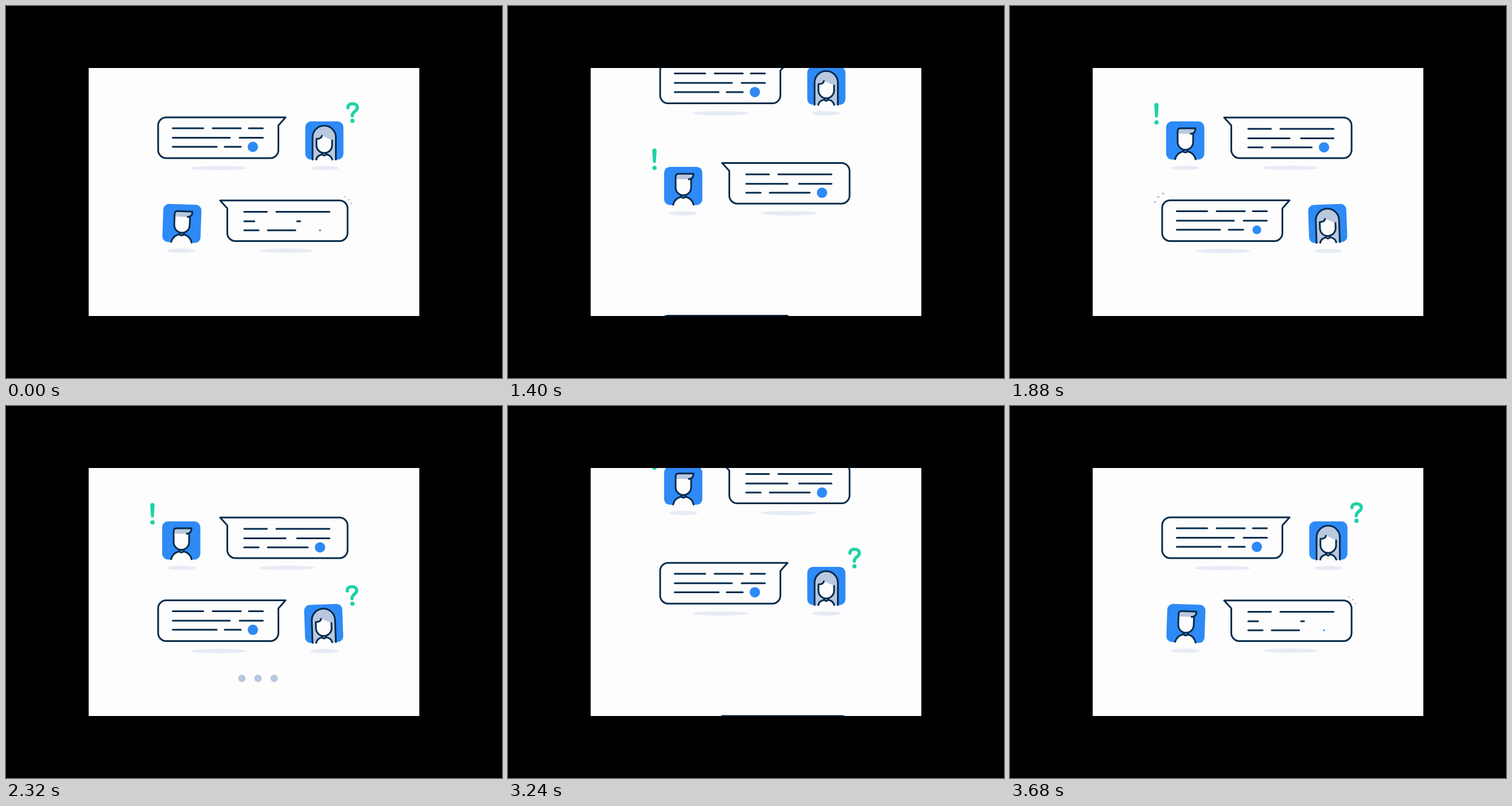
An HTML page that plays this animation: 864 px wide and 648 px high, repeating every 3720 ms.

```html
<!DOCTYPE html>
<html lang="en">
<head>
<meta charset="utf-8">
<title>Chat loop</title>
<style>
  html, body { margin: 0; width: 100%; height: 100%; overflow: hidden; background: #000; }
  svg { display: block; width: 864px; height: 648px; }
  .ink { fill: none; stroke: #052c4c; stroke-width: 3; stroke-linecap: round; stroke-linejoin: round; }
  .box { fill: #fdfdfd; }
  .blue { fill: #2e8af6; }
  .grey { fill: #b9c7df; }
  .white { fill: #fdfdfd; }
  .shade { fill: #e6ebf5; }
  .green { fill: #20d2a5; }
  .hook { fill: none; stroke: #20d2a5; stroke-width: 5.6; stroke-linecap: round; }
</style>
</head>
<body>
<svg viewBox="0 0 864 648">
  <defs><clipPath id="panel"><rect x="144" y="108" width="576" height="432"/></clipPath></defs>
  <rect width="864" height="648" fill="#000"/>
  <rect x="144" y="108" width="576" height="432" class="white"/>
  <g id="stage" clip-path="url(#panel)"></g>
</svg>
<script>
const HALF = 1840, CYCLE = 2 * HALF, LOOP = 3720;

// Both messages are laid out at their resting place in the lower row.
const woman = {
  delay: 0, sign: -1,
  bubble: 'M279 338.5H487L474.5 352.5V395.5A14 14 0 0 1 460.5 409.5H279A14 14 0 0 1 265 395.5V352.5A14 14 0 0 1 279 338.5Z',
  // x1, x2, y, start of drawing
  lines: [
    [290.5, 343.5, 357.5, 1426], [360, 409, 357.5, 1535], [423, 447.5, 357.5, 1569],
    [290.5, 390, 374, 1605], [407, 447.5, 374, 1625],
    [290.5, 367, 389.8, 1660], [381, 409, 389.8, 1690]
  ],
  disc: [430, 389.8, 1800],
  bubbleShade: 370.5, faceX: 554.7, shadeY: 426.8,
  corner: [279, 353], sparkStart: 1625,
  markAt: [603.5, 344.5],
  mark: `<path class="hook" d="M595.6 321.6C595.6 317 599 314.8 603.8 314.8C609 314.8 612 317.6 612 321.8C612 328 603.2 328 603.2 335.6"/>
    <circle class="green" cx="603.5" cy="344.5" r="3.7"/>`,
  face: `<rect class="blue" x="521.3" y="345.6" width="66.5" height="66.5" rx="10"/>
    <path class="grey" d="M534 412V373.3A20.3 20.3 0 0 1 574.6 373.3V412Z"/>
    <path class="white" d="M540.5 413C541.5 406 546 403.5 550.5 402.5H558C563 403.5 567 406 568.2 413Z"/>
    <path class="white" d="M540.8 376Q549.5 376 550.3 370L568 378.5V387A13.6 13.6 0 0 1 540.8 387Z"/>
    <path class="ink" d="M534 412V373.3A20.3 20.3 0 0 1 574.6 373.3V412
      M550.3 370.5Q549.5 376 540.8 376V387A13.6 13.6 0 0 0 568 387V378.5
      M540.5 412C541.5 407 546 404 550.5 403 M558 403C563 404 567 407 568.2 412
      M550.5 402Q554.3 408 558 402"/>`
};

const man = {
  delay: HALF, sign: 1,
  bubble: 'M373 338.8H581A14 14 0 0 1 595 352.8V395.5A14 14 0 0 1 581 409.5H399.5A14 14 0 0 1 385.5 395.5V352.5Z',
  lines: [
    [415, 454.5, 358.5, 1430], [471, 563.5, 358.5, 1500],
    [415, 487, 375, 1762], [507, 563.5, 375, 1793],
    [415, 440, 390.7, 1595], [456, 525.5, 390.7, 1691]
  ],
  disc: [547, 390.7, 1828],
  bubbleShade: 489, faceX: 305, shadeY: 426.3,
  corner: [581, 353], sparkStart: 1740,
  markAt: [255.2, 347.3],
  mark: `<path class="green" d="M251.2 317.5Q251.2 313.5 255 313.5T258.9 317.5L257.6 336.5Q257.2 339 255 339T252.6 336.5Z"/>
    <circle class="green" cx="255.2" cy="347.3" r="3.8"/>`,
  face: `<rect class="blue" x="272" y="345.5" width="66.5" height="66.5" rx="10"/>
    <path class="white" d="M287.6 413C289.5 404 294 399.5 301.5 397.8H309.5C317 399.5 321.5 404 323.3 413Z"/>
    <path class="white" d="M292 364H319V381.5A13.5 13.5 0 0 1 292 381.5Z"/>
    <path class="grey" d="M292 367V362.5Q292 357.5 297 357.5H323Q323 367 315 367Z"/>
    <path class="ink" d="M314.8 367Q323 367 323 357.5H297Q292 357.5 292 362.5V381.5A13.5 13.5 0 0 0 319 381.5V367
      M287.6 411.5C289.5 404 294 399.5 301.5 397.8 M309.5 397.8C317 399.5 321.5 404 323.3 411.5
      M301.3 396Q302 399.6 305.5 399.6T309.7 396"/>`
};

const clamp = x => Math.max(0, Math.min(1, x));
const span = (t, start, dur) => clamp((t - start) / dur);
const sine = x => 0.5 - 0.5 * Math.cos(Math.PI * x);
const outCubic = x => 1 - (1 - x) ** 3;
const outBack = x => x <= 0 ? 0 : 1 + 2.4 * (x - 1) ** 3 + 1.4 * (x - 1) ** 2;

// Smooth value through [time, value] pairs
function track(t, keys) {
  if (t <= keys[0][0]) return keys[0][1];
  for (let i = 1; i < keys.length; i++) {
    const [a, from] = keys[i - 1], [b, to] = keys[i];
    if (t < b) return from + (to - from) * sine((t - a) / (b - a));
  }
  return keys[keys.length - 1][1];
}

const scroll = t => 1.007 * sine(span(t, 1200, 430)) - 0.007 * sine(span(t, 1640, 140));
const TILT = [[1480, 0], [1640, 3.9], [1840, 2], [2320, 2], [2560, 0]];
const SWING = [[1980, 0], [2320, 3], [2600, 4], [2860, 0]];

const stage = document.getElementById('stage');
function add(parent, name, attrs = {}, inner = '') {
  const el = document.createElementNS('http://www.w3.org/2000/svg', name);
  set(el, attrs);
  el.innerHTML = inner;
  return parent.appendChild(el);
}
function set(el, attrs) {
  for (const k in attrs) el.setAttribute(k, attrs[k]);
}
const show = (el, on) => set(el, { visibility: on ? 'inherit' : 'hidden' });

function makeRow(spec, extra) {
  const g = add(stage, 'g');
  const shade = add(g, 'ellipse', { class: 'shade', cx: spec.bubbleShade, cy: spec.shadeY, ry: 3.7 });
  add(g, 'ellipse', { class: 'shade', cx: spec.faceX, cy: spec.shadeY, rx: 25, ry: 3.7 });
  add(g, 'path', { class: 'ink box', d: spec.bubble, style: 'fill:#fdfdfd' });
  return {
    spec, extra, g, shade,
    lines: spec.lines.map(([x, , y]) => add(g, 'line', { class: 'ink', x1: x, y1: y, y2: y })),
    disc: add(g, 'circle', { class: 'blue', cx: spec.disc[0], cy: spec.disc[1] }),
    sparks: [0, 1, 2].map(() => add(g, 'circle', { class: 'grey' })),
    face: add(g, 'g', {}, spec.face),
    mark: add(g, 'g', {}, spec.mark)
  };
}

function drawRow(row, t) {
  const s = row.spec;
  const age = (t - s.delay + CYCLE) % CYCLE + row.extra;
  const y = 367 * (1 - scroll(age)) - 144.5 * scroll(age - HALF) - 211 * scroll(age - CYCLE);
  show(row.g, y > -300 && y < 240);
  set(row.g, { transform: `translate(0 ${y.toFixed(3)})` });

  set(row.shade, { rx: 49 * outCubic(span(age, 1640, 300)) });
  row.lines.forEach((el, i) => {
    const [x1, x2, , start] = s.lines[i];
    const p = sine(span(age, start, 240));
    show(el, p > 0);
    set(el, { x2: x1 + (x2 - x1) * p + 0.01 });
  });
  set(row.disc, { r: 9 * Math.max(0, outBack(span(age, s.disc[2], 280))) });

  row.sparks.forEach((el, i) => {
    const p = span(age, s.sparkStart, 400);
    const a = (65 - 20.5 * i) * Math.PI / 180;
    const d = 21 + 11 * sine(p);
    set(el, {
      cx: s.corner[0] + s.sign * d * Math.cos(a),
      cy: s.corner[1] - d * Math.sin(a),
      r: 2.2 * Math.sin(Math.PI * p)
    });
  });

  set(row.face, { transform: `rotate(${s.sign * track(age, TILT)} ${s.faceX} 412)` });
  const [mx, my] = s.markAt;
  const size = Math.max(0, outBack(span(age, 1960, 280)));
  show(row.mark, size > 0);
  set(row.mark, {
    transform: `translate(${mx} ${my}) rotate(${s.sign * track(age, SWING)}) scale(${size}) translate(${-mx} ${-my})`
  });
}

const rows = [woman, man].flatMap(s => [makeRow(s, 0), makeRow(s, CYCLE)]);
const dots = [410.8, 439, 467.2].map(x => add(stage, 'circle', { class: 'grey', cx: x, cy: 474.4 }));

function draw(time) {
  const t = Math.min(time % LOOP, CYCLE);
  rows.forEach(r => drawRow(r, t));
  const h = t % HALF;
  dots.forEach((el, i) => {
    const grow = sine(span(h, 200 + 60 * i, 160));
    const fade = sine(span(h, 590 + 40 * i, 160));
    set(el, { r: 6.4 * grow * (1 - fade) });
  });
}

const begin = performance.now();
function tick() {
  draw(performance.now() - begin);
  requestAnimationFrame(tick);
}
tick();
</script>
</body>
</html>
```
